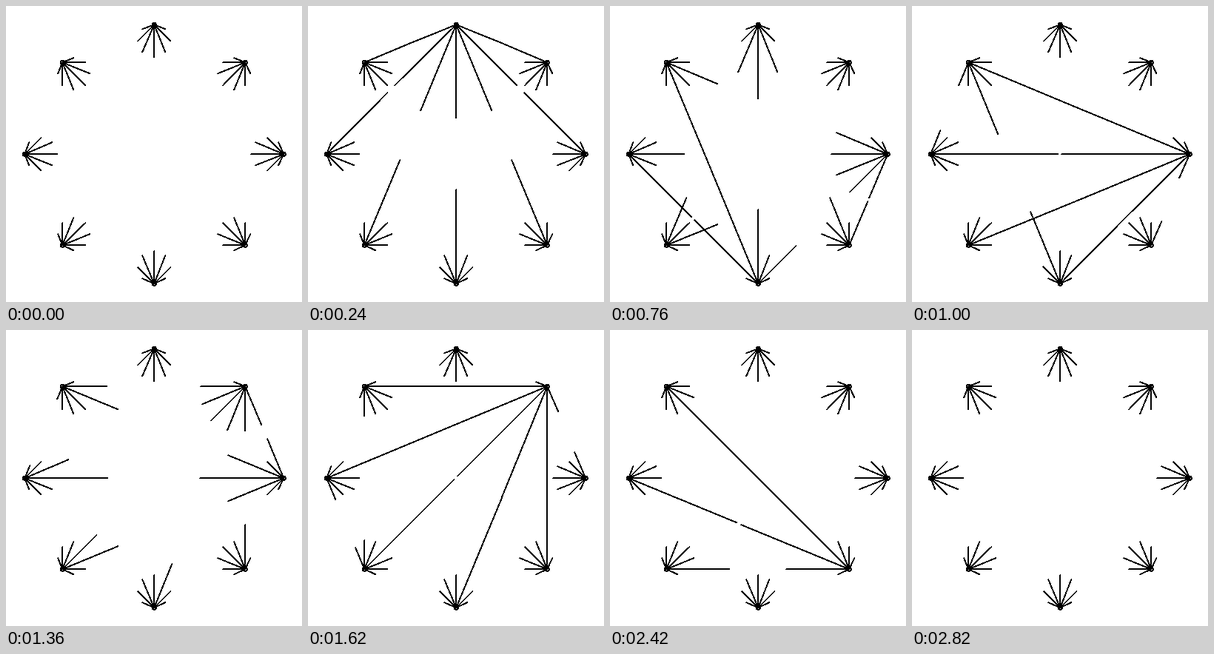
Recreate the animation shown at these times as an HTML page. Size 400 px wide and 400 px high, loop 3140 ms.

```html
<!DOCTYPE html>
<html lang="en">
<head>
<meta charset="utf-8">
<title>Eight points</title>
<style>
html, body { margin: 0; height: 100%; overflow: hidden; background: #fff; }
svg { display: block; width: 100vw; height: 100vh; }
</style>
</head>
<body>
<svg viewBox="0 0 400 400" fill="none" stroke="#000" stroke-width="2" stroke-linecap="round" shape-rendering="crispEdges">
  <path id="dots"/>
  <path id="rays"/>
</svg>
<script>
const LOOP = 3140, STEP = 20;
const COUNT = 8, RADIUS = 175, REST = 1 / 8, DOT = 2.5;
const GAP = 312.5, HOLD = 125, MS_PER_PX = 1.174;

// Line ends sit on a whole-pixel grid, a quarter pixel in
const snap = v => Math.floor(v + 0.25) + 0.25;

const nodes = Array.from({ length: COUNT }, (_, i) => {
  const a = i * Math.PI / 4;
  return [200 + RADIUS * Math.sin(a), 200 - RADIUS * Math.cos(a)];
});

// Nodes fire in bit-reversed order: 0 4 2 6 1 5 3 7
const slot = i => (i & 1) * 4 + (i & 2) + (i >> 2);

const pairs = [];
for (let i = 0; i < COUNT; i++)
  for (let j = i + 1; j < COUNT; j++)
    pairs.push({
      a: nodes[i], b: nodes[j], start: slot(i) * GAP,
      rise: 2 * RADIUS * Math.sin((j - i) * Math.PI / 8) * MS_PER_PX
    });

// Share of the chord drawn from each end: grow, hold, shrink
function reach(t, rise) {
  const p = Math.min(t, 2 * rise + HOLD - t) / rise;
  const k = Math.max(0, Math.min(1, p));
  return REST + (0.5 - REST) * (1 - Math.cos(Math.PI * k)) / 2;
}

function ray(a, b, f) {
  const end = a.map((v, k) => v + (b[k] - v) * f);
  return `M${a.map(snap)}L${end.map(snap)}`;
}

const dots = document.getElementById('dots');
const rays = document.getElementById('rays');
dots.setAttribute('d', nodes.map(node => {
  const [x, y] = node.map(snap);
  const arc = `a${DOT} ${DOT} 0 1 0 `;
  return `M${x - DOT} ${y}${arc}${2 * DOT} 0${arc}${-2 * DOT} 0`;
}).join(''));

function draw(time) {
  const t = Math.floor(time % LOOP / STEP) * STEP;
  rays.setAttribute('d', pairs.map(({ a, b, start, rise }) => {
    const f = reach(t - start, rise);
    return ray(a, b, f) + ray(b, a, f);
  }).join(''));
}

const begin = performance.now();
function tick() {
  draw(performance.now() - begin);
  requestAnimationFrame(tick);
}
tick();
</script>
</body>
</html>
```
